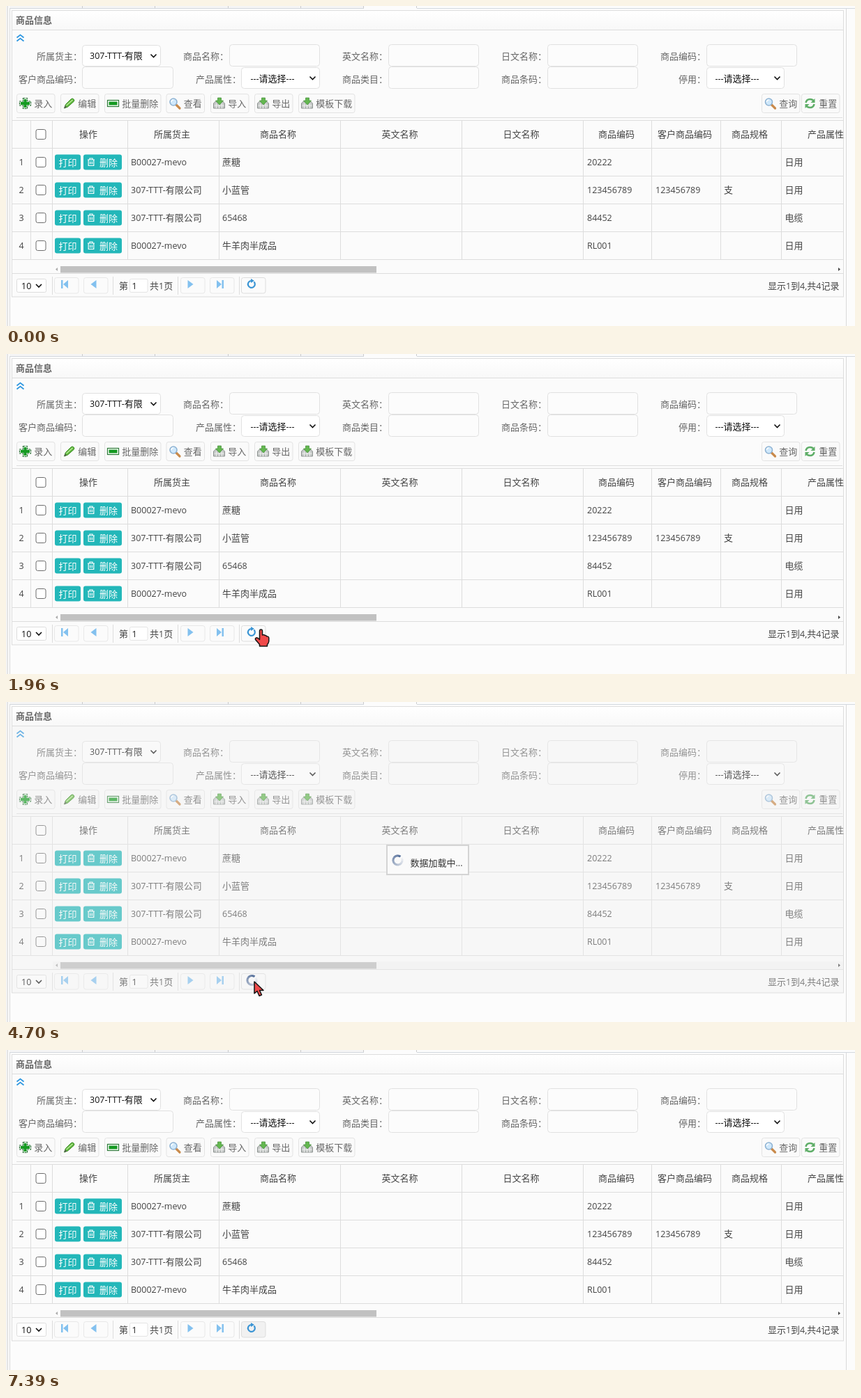
These frames come from a looping animation (1217 by 460 pixels, 8.01 s). An HTML page:

```html
<!DOCTYPE html>
<html lang="zh-CN">
<head>
<meta charset="utf-8">
<title>商品信息</title>
<style>
html, body { margin: 0; width: 100%; height: 100%; overflow: hidden; background: #fcfcfc; }
svg { display: block; width: 100%; height: 100%; }
text { font: 13px "Noto Sans CJK SC", "Noto Sans CJK", sans-serif; white-space: pre; }
.lat { font-family: "Open Sans", "Noto Sans", sans-serif; font-size: 12.5px; }
</style>
</head>
<body>
<svg id="stage" viewBox="0 0 1217 460">
  <defs>
    <clipPath id="panelClip"><rect x="8" y="6" width="1193" height="412"/></clipPath>
    <clipPath id="ownerClip"><rect x="110" y="57" width="87" height="28"/></clipPath>
    <linearGradient id="head" x2="0" y2="1"><stop stop-color="#fff"/><stop offset="1" stop-color="#f8f8f8"/></linearGradient>
    <g id="add">
      <path d="M-3-7.5H3V-3H8V3H3V7.5H-3V3H-8V-3H-3Z" fill="#fff" stroke="#1e6b2a" stroke-width="1.2" stroke-dasharray="3 1"/>
      <path d="M-2-6H2V-2H6.500V2H2V6H-2V2H-6.500V-2H-2Z" fill="#159a22"/>
    </g>
    <g id="edit">
      <path d="M-7 7L-5 1.500 3-6.500Q5-8 7-5.500 8-4 6.500-2.500L-2 5Z" fill="#5fb83c" stroke="#3b8a28"/>
      <path d="M-4 3L5-5" stroke="#b9e59b" stroke-width="1.500"/>
      <path d="M-7 7L-6 3.500-3.500 5.500Z" fill="#555"/>
    </g>
    <g id="minus">
      <rect x="-8" y="-4.500" width="16" height="9" fill="#fff" stroke="#2d7a38" stroke-width="1.200"/>
      <rect x="-6" y="-2.500" width="12" height="5" fill="#159a22"/>
    </g>
    <g id="find">
      <path d="M2 2L7 7" stroke="#c98a4b" stroke-width="3.200" stroke-linecap="round"/>
      <circle cx="-2" cy="-2" r="5" fill="#cfe8fb" stroke="#8fb3d3" stroke-width="1.600"/>
      <path d="M-5-2Q-5-5-2-5" fill="none" stroke="#fff" stroke-width="1.300"/>
    </g>
    <g id="box">
      <path d="M-8 0L-5-3H5L8 0V7H-8Z" fill="#c4c8c6" stroke="#8d9290"/>
      <path d="M-7 3H7M-4 0V7M0 0V7M4 0V7" stroke="#eee"/>
      <path d="M-2-8H3V-4H6L.5 2-5-4H-2Z" fill="#64b850" stroke="#3f8c35" stroke-width=".7"/>
    </g>
    <g id="swap" fill="none" stroke="#5fae68" stroke-width="2.600">
      <path d="M-6-1Q-5-6 0-6 3-6 5-4M6 1Q5 6 0 6-3 6-5 4"/>
      <path d="M7-7V-1H1ZM-7 7V1H-1Z" fill="#5fae68" stroke="none"/>
    </g>
    <g id="trash" fill="none" stroke="#fff" stroke-width="1.200">
      <path d="M-5-3.500H5M-2-3.500V-5.500H2V-3.500M-3.800-3.500V5H3.800V-3.500M-1.300-1V3M1.300-1V3"/>
    </g>
  </defs>
  <g id="back"></g>
  <g id="hover"></g>
  <g id="ui"></g>
  <g id="mask" display="none"></g>
  <g id="cursor" display="none">
    <path id="arrow" d="M0 0V17L4 13.500 7 20.500 10.500 19 7.500 12.500H13Z" fill="#f04a4a" stroke="#151515" stroke-width="1.500" stroke-linejoin="round"/>
    <path id="hand" d="M-2 .8Q-1.800-1 0-1 1.800-1 2 .8V7Q4 6 5.500 7.500 7.500 7 8.300 9 11 8.500 11.300 11V16Q11 19 9 20.500V23H-2V20.500Q-5 17-8 13.500-8.500 11-6 10.700-4 11-2 13.500Z" fill="#f04a4a" stroke="#151515" stroke-width="1.500" stroke-linejoin="round"/>
  </g>
</svg>
<script>
const NS = "http://www.w3.org/2000/svg";
const $ = id => document.getElementById(id);
let layer = $("back");

function add(tag, attrs, parent = layer) {
  const el = document.createElementNS(NS, tag);
  for (const k in attrs) el.setAttribute(k, attrs[k]);
  parent.appendChild(el);
  return el;
}
const box = (x, y, x2, y2, fill, stroke = "none", rx = 0) =>
  add("rect", { x, y, width: x2 - x, height: y2 - y, fill, stroke, rx });
const line = (d, stroke = "#ddd", width = 1) =>
  add("path", { d, fill: "none", stroke, "stroke-width": width });
const shape = (d, fill) => add("path", { d, fill });
const icon = (id, x, y) => add("use", { href: "#" + id, x, y });
const chevron = (x, y) => line(`M${x - 4} ${y - 2}l4 4 4-4`, "#111", 1.6);

// Latin runs get their own face and size
function text(str, x, y, fill = "#444", more = {}) {
  const el = add("text", { x, y, fill, ...more });
  for (const run of str.match(/[ -~]+|[^ -~]+/g)) {
    const part = add("tspan", /^[ -~]/.test(run) ? { class: "lat" } : {}, el);
    part.textContent = run;
  }
  return el;
}
const mid = (str, x, y, fill) => text(str, x, y, fill, { "text-anchor": "middle" });

const COLS = [35.5, 66.5, 174.5, 305.5, 479.5, 653.5, 827.5, 925.5, 1024.5, 1111.5];
const rowTop = i => 204.5 + 40 * i;

function drawFrame() {
  box(0, 0, 1217, 460, "#fcfcfc");
  box(0, 0, 2, 460, "#f2f2f2");
  line("M2.500 0V460M5.500 4V460M1204.500 4V460", "#d9d9d9");
  box(5, 0, 513, 3, "#f5f5f5");
  line("M5 3.500H513M589 3.500H1217", "#d3d8de");
  line("M109.500 0V3M213.500 0V3M318.500 0V3M422.500 0V3M512.500 0V3M588.500 0V3", "#ccc");
  box(8.5, 6.5, 1200.5, 418, "#fbfbfb", "#ddd");
  box(9, 7, 1200, 34, "url(#head)");
  line("M8 34.500H1201");
  text("商品信息", 14, 25, "#666", { style: "font-weight:700" });
}

function drawForm() {
  line("M15.500 45.500l5-4 5 4M15.500 50.500l5-4 5 4", "#2b95e0", 1.7);
  const field = (x, y, x2) => box(x + .5, y + .5, x2 - .5, y + 31.5, "#fcfcfc", "#e1e1e1", 4);
  const select = (x, y, x2) => {
    box(x + .5, y + .5, x2 - .5, y + 30.5, "#fff", "#e1e1e1", 4);
    chevron(x2 - 10.5, y + 15.5);
  };
  const labels = [
    [77, "所属货主", 44, "商品名称", 254, "英文名称", 482, "日文名称", 710, "商品编码", 938],
    [110, "客户商品编码", 18, "产品属性", 272, "商品类目", 482, "商品条码", 710, "停用", 964]
  ];
  for (const [y, ...list] of labels)
    for (let i = 0; i < list.length; i += 2) text(list[i] + "：", list[i + 1], y, "#666");
  for (const x of [320, 548, 776, 1004]) field(x, 55, x + 130);
  for (const x of [109, 548, 776]) field(x, 87, x + (x < 200 ? 131 : 130));
  select(109, 56, 222);
  select(337, 88, 450);
  select(1004, 88, 1116);
  text("307-TTT-有限", 120, 76, "#111", { "clip-path": "url(#ownerClip)" });
  mid("---请选择---", 382, 109, "#111");
  mid("---请选择---", 1048, 109, "#111");

  const tools = [
    ["add", 15, "录入"], ["edit", 78, "编辑"], ["minus", 141, "批量删除"], ["find", 229.5, "查看"],
    ["box", 293, "导入"], ["box", 356, "导出"], ["box", 419, "模板下载"],
    ["find", 1083, "查询"], ["swap", 1140, "重置"]
  ];
  for (const [id, x, label] of tools) {
    box(x + .5, 126.5, x + 29 + label.length * 13, 153.5, "#fafafa", "#e3e3e3", 3);
    icon(id, x + 12.5, 140);
    text(label, x + 25.3, 145, "#666");
  }
  line("M15 160.500H1199");
}

function drawTable() {
  line(`M8 164.500H1201` + [0, 1, 2, 3, 4].map(i => `M8 ${rowTop(i)}H1201`).join(""));
  line(COLS.map(x => `M${x} 164V364.500`).join(""));
  const heads = ["操作", 118, "所属货主", 238, "商品名称", 390, "英文名称", 564.5, "日文名称", 738.5,
    "商品编码", 875, "客户商品编码", 973, "商品规格", 1066, "产品属性", 1175];
  for (let i = 0; i < heads.length; i += 2)
    add("g", { "clip-path": "url(#panelClip)" }).appendChild(mid(heads[i], heads[i + 1], 189));

  const check = y => box(43, y - 7, 57, y + 7, "#fff", "#6d6d6d", 2.5);
  check(184.5);
  const owners = ["B00027-mevo", "307-TTT-有限公司"];
  const rows = [
    [0, "蔗糖", "20222", "", "", "日用"],
    [1, "小蓝管", "123456789", "123456789", "支", "日用"],
    [1, "65468", "84452", "", "", "电缆"],
    [0, "牛羊肉半成品", "RL001", "", "", "日用"]
  ];
  const at = [310, 833, 931, 1029, 1116.5];
  rows.forEach(([owner, ...cells], i) => {
    const y = rowTop(i) + 20;
    mid(String(i + 1), 22, y + 4.5);
    check(y);
    box(70, y - 11, 107, y + 11, "#23b7b9", "none", 3);
    box(111, y - 11, 166, y + 11, "#23b7b9", "none", 3);
    text("打印", 75.5, y + 5, "#fff");
    icon("trash", 122, y);
    text("删除", 134, y + 5, "#fff");
    text(owners[owner], 179, y + 4.5);
    cells.forEach((c, k) => c && text(c, at[k], y + 4.5));
  });
  box(78, 374, 531, 383.5, "#c1c1c1");
  shape("M74 376v5l-3-2.500z", "#aaa");
  shape("M1193 376v5l3-2.500z", "#444");
}

let reloadBox, reloadIcon;
function drawPager() {
  line("M8 384.500H1201");
  line("M66.500 389V415M153.500 389V415M246.500 389V415M334.500 389V415");
  box(15.5, 392.5, 57.5, 411.5, "#fff", "#ddd", 2);
  text("10", 22, 406.5, "#111");
  chevron(47, 402);
  for (const x of [69, 111, 250, 292, 337]) {
    reloadBox = box(x + .5, 390.5, x + 35, 413, "#fbfbfb", "#e8e8e8", 3);
  }
  reloadBox.setAttribute("stroke", "#ddd");
  const blue = "#83c1ef";
  shape("M79 394h2.500v12h-2.500zM89 394v12l-7-6z", blue);
  shape("M129.500 394v12l-8-6z", blue);
  shape("M260.500 394v12l8-6z", blue);
  shape("M302 394v12l7-6zM309.500 394h2.500v12h-2.500z", blue);
  reloadIcon = add("g", {});
  add("path", { d: "M355.500 396.500A5 5 0 1 1 351 395", fill: "none", stroke: "#3a94d4", "stroke-width": 2.2 }, reloadIcon);
  add("path", { d: "M351 392v6l5-3z", fill: "#3a94d4" }, reloadIcon);
  text("第", 162, 407);
  box(177.5, 392.5, 203, 411.5, "#fff", "#e4e4e4", 2);
  text("1", 180.5, 406.5, "#222");
  text("共1页", 206, 407);
  text("显示1到4,共4记录", 1194.5, 406.5, "#444", { "text-anchor": "end" });
}

// Ring of short arcs fading along the turn
function spinner(x, y) {
  const place = add("g", { transform: `translate(${x} ${y})` });
  const ring = add("g", {}, place);
  const n = 16, r = 6.5;
  for (let i = 0; i < n; i++) {
    const p = a => `${r * Math.cos(a)} ${r * Math.sin(a)}`;
    const a = i / n * 2 * Math.PI;
    add("path", {
      d: `M${p(a)}A${r} ${r} 0 0 1 ${p(a + 2.1 * Math.PI / n)}`,
      fill: "none", stroke: "#4a6694", "stroke-width": 3, opacity: i / n
    }, ring);
  }
  return ring;
}

drawFrame();
layer = $("hover");
const hoverRows = [0, 1, 2, 3].map(i => box(36, rowTop(i), 1200.5, rowTop(i + 1), "none"));
layer = $("ui");
drawForm();
drawTable();
drawPager();
layer = $("mask");
box(67, 373, 1200, 384, "#000").setAttribute("opacity", .02);
box(9, 35, 1200, 417.5, "#eee").setAttribute("opacity", .34);
box(546, 206, 663, 248, "#fafafa", "#d4d4d4").setAttribute("stroke-width", 2);
text("数据加载中...", 579.5, 236, "#333");
const rings = [spinner(561.5, 227.5), spinner(352.5, 400)];

const LOOP = 8010, STEP = 40;
const LOADS = [[2580, 2820], [3270, 3390], [3960, 4120], [4700, 4820], [5360, 5520], [6020, 6220]];
// time, x, y of the pointer
const PATH = [
  [410, 818, 432], [450, 693, 380], [490, 595, 358], [540, 520, 345], [640, 455, 332], [760, 432, 320],
  [890, 426, 315], [1640, 426, 315], [1720, 420, 325], [1840, 388, 365], [1920, 368, 392], [2000, 363, 402],
  [2290, 363, 402], [2330, 362, 402], [3680, 362, 402], [3760, 356, 402], [6380, 356, 402],
  [6420, 427, 402], [6500, 671, 403], [6580, 912, 405], [6680, 1134, 428], [6740, 1175, 432],
  [6800, 1200, 440], [6880, 1075, 453], [6940, 934, 459], [6980, 934, 470]
];

function pointer(t) {
  if (t < 410 || t >= 6980) return null;
  const base = t < 1640 ? 410 : t < 3680 ? 1640 : t < 6380 ? 3680 : 6380;
  const q = base + Math.floor((t - base) / STEP) * STEP;
  const i = PATH.findIndex(p => p[0] > q);
  const [a, b] = [PATH[i - 1], PATH[i]];
  const k = (q - a[0]) / (b[0] - a[0]);
  return [a[1] + (b[1] - a[1]) * k, a[2] + (b[2] - a[2]) * k];
}
const show = (el, on) => el.setAttribute("display", on ? "inline" : "none");

function render(t) {
  const p = pointer(t);
  const load = LOADS.find(([s, e]) => t >= s && t < e);
  const row = p ? Math.floor((p[1] - 204.5) / 40) : -1;
  hoverRows.forEach((el, i) =>
    el.setAttribute("fill", i === row ? "#e5e5e5" : i === 3 && row === 2 ? "#f4f4f4" : "none"));

  show($("mask"), load);
  show(reloadIcon, !load);
  reloadBox.setAttribute("fill", t >= 6380 ? "#f1f1f1" : "#fbfbfb");
  const turn = Math.floor(t / STEP) * STEP * .45 % 360;
  for (const r of rings) r.setAttribute("transform", `rotate(${turn})`);

  show($("cursor"), p);
  if (!p) return;
  $("cursor").setAttribute("transform", `translate(${p[0]} ${p[1]})`);
  const onButton = p[0] > 337 && p[0] < 372 && p[1] > 391 && p[1] < 413;
  const hand = onButton && !(load && t < load[1] - STEP);
  show($("hand"), hand);
  show($("arrow"), !hand);
}

function tick() {
  render(performance.now() % LOOP);
  requestAnimationFrame(tick);
}
tick();
</script>
</body>
</html>
```
